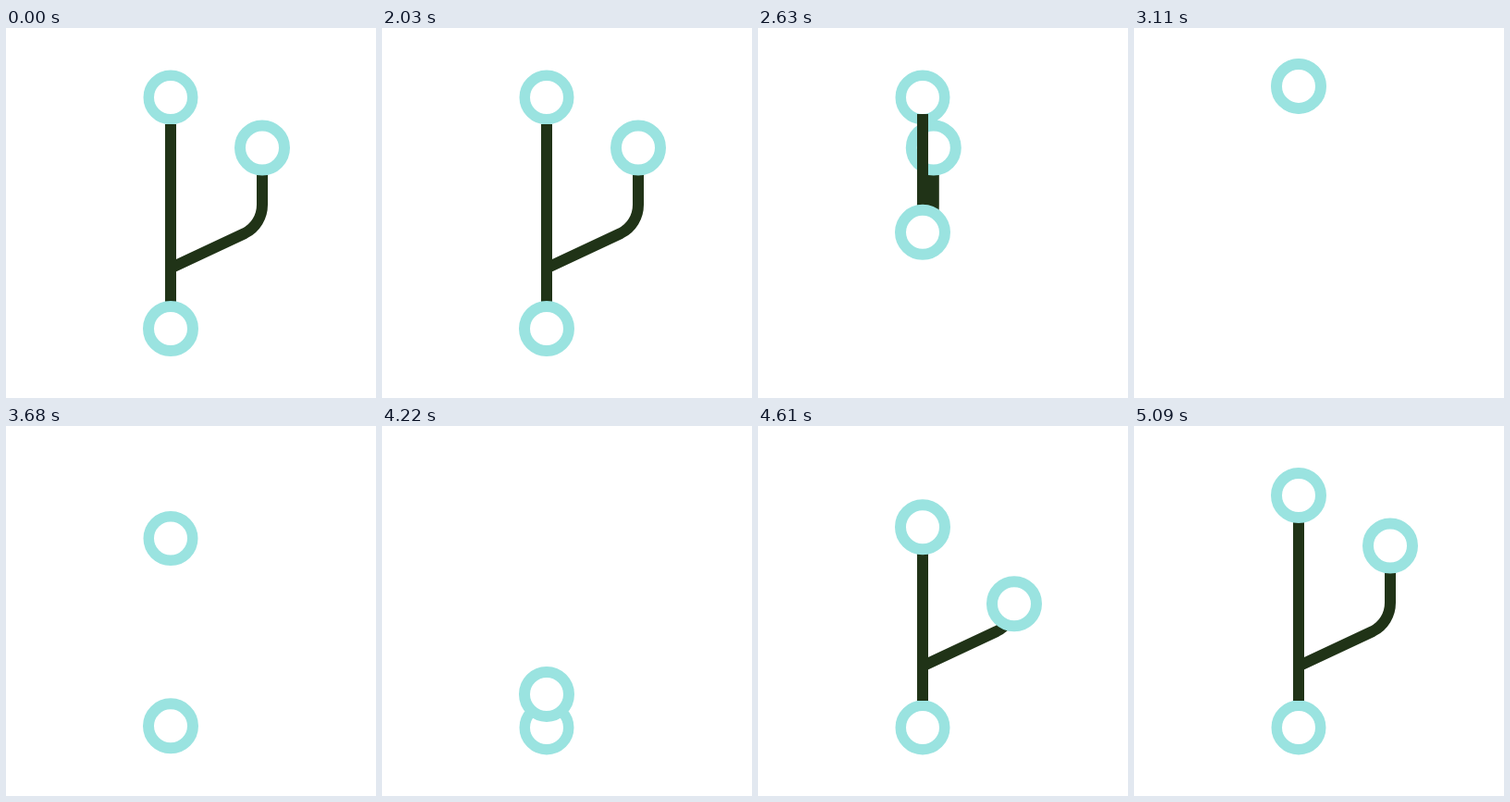
Write an HTML page that moves like this. It is 400 by 400 pixels and loops after 5.12 s.

```html
<!DOCTYPE html>
<html>
<head>
<meta charset="utf-8">
<style>
  html, body { margin: 0; width: 100%; height: 100%; overflow: hidden; background: #fff; }
  svg { display: block; width: 100%; height: 100%; }
  circle { fill: #fff; stroke: #9ae3e0; stroke-width: 12; }
  path { fill: none; stroke: #203317; stroke-width: 12; }
</style>
</head>
<body>
<svg viewBox="0 0 400 400">
  <defs><clipPath id="above"><rect id="aboveRect" width="400" height="400"/></clipPath></defs>
  <g clip-path="url(#above)"><path id="branch"/></g>
  <circle id="side" r="24"/>
  <circle id="anchor" r="23.75" style="stroke-width:11.5"/>
  <path id="trunk"/>
  <circle id="mover" r="24"/>
</svg>
<script>
const LOOP = 5120;
const X = 178;
const JUNCTION_Y = 259.5;
const EMERGE = 4318;
const $ = id => document.getElementById(id);
const [branch, side, anchor, trunk, mover, aboveRect] =
  ['branch', 'side', 'anchor', 'trunk', 'mover', 'aboveRect'].map($);

const clamp = v => Math.min(1, Math.max(0, v));

// Cubic bezier (.75, 0, .25, 1), solved for x by bisection.
function ease(x) {
  if (x <= 0 || x >= 1) return clamp(x);
  let lo = 0, hi = 1;
  for (let i = 0; i < 24; i++) {
    const s = (lo + hi) / 2, r = 1 - s;
    if (2.25 * s * r * r + 0.75 * s * s * r + s * s * s < x) lo = s; else hi = s;
  }
  return lo * lo * (3 - 2 * lo);
}
const move = (t, start, duration) => ease((t - start) / duration);

function place(circle, x, y) {
  circle.setAttribute('cx', x);
  circle.setAttribute('cy', y);
}

function show(el, visible) {
  el.style.display = visible ? '' : 'none';
}

function branchPath(k) {
  const x = v => X + (v - X) * k;
  return `M${X} ${JUNCTION_Y}L${x(258)} 222C${x(270)} 216 ${x(277)} 204 ${x(277)} 191V129.5`;
}

branch.setAttribute('d', branchPath(1));
const branchLength = branch.getTotalLength();

function drawTrunk(top, bottom) {
  show(trunk, bottom > top);
  trunk.setAttribute('d', `M${X} ${top}V${bottom}`);
}

function collapse(t, y, rise) {
  const k = 1 - move(t, 2033, 900);
  branch.setAttribute('d', branchPath(k));
  branch.style.strokeDasharray = 'none';
  aboveRect.setAttribute('height', Math.max(0, y));
  place(side, X + 99 * k, Math.min(129.5, y));
  drawTrunk(104 - 11 * clamp(rise / 0.2), y);
}

function grow(t, y) {
  const q = 1 - Math.pow(1 - clamp((t - EMERGE) / (5090 - EMERGE)), 2.3);
  const end = branch.getPointAtLength(q * branchLength);
  branch.style.strokeDasharray = `${q * branchLength} 999`;
  place(side, end.x, end.y);
  drawTrunk(y, 297);
}

function render(t) {
  const rise = move(t, 2000, 1340);
  const top = 325 - 268 * rise;
  const y = top + 269 * move(t, 3310, 410) - 251 * move(t, 3742, 1340);
  place(mover, X, y);
  place(anchor, X, Math.min(75, top) + 269 * move(t, 3510, 410));

  const collapsing = t < 3100, growing = t >= EMERGE;
  show(side, collapsing || growing);
  show(branch, collapsing || growing);
  if (collapsing) {
    collapse(t, y, rise);
  } else {
    branch.setAttribute('d', branchPath(1));
    aboveRect.setAttribute('height', 400);
    if (growing) grow(t, y);
    else drawTrunk(y, t > 3950 ? 297 : y);
  }
}

const origin = performance.now();
function tick() {
  render((performance.now() - origin) % LOOP);
  requestAnimationFrame(tick);
}
tick();
</script>
</body>
</html>
```
